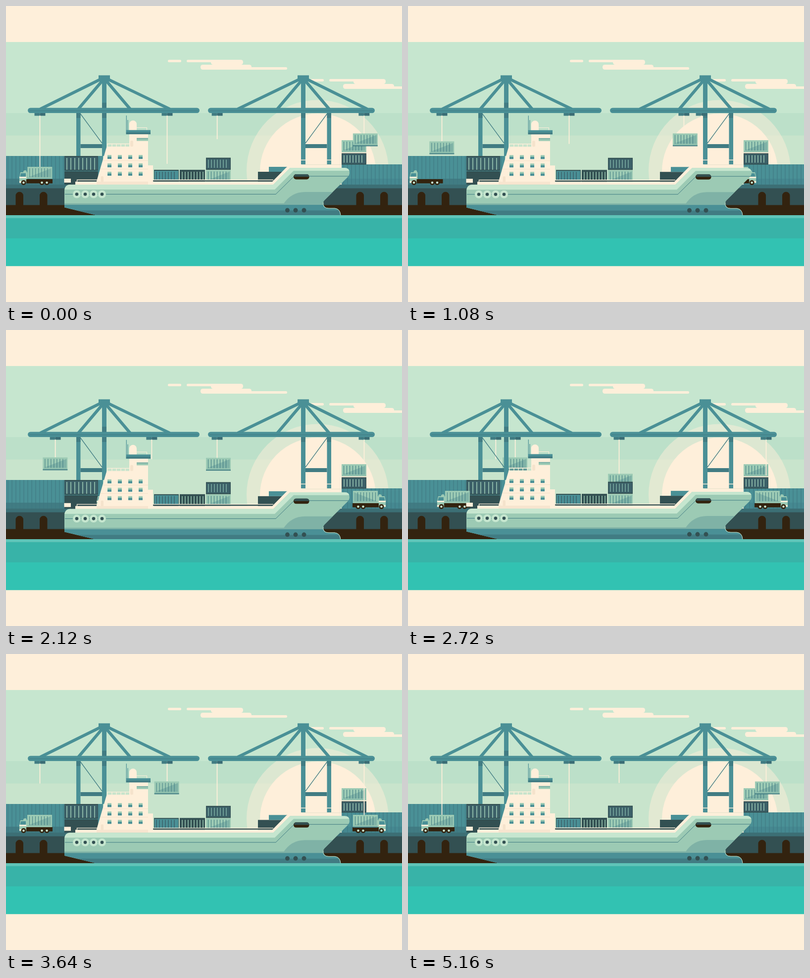
Recreate the animation shown at these times as an HTML page. Size 800x600 px, loop 5.2 s.

```html
<!DOCTYPE html>
<html lang="en">
<head>
<meta charset="utf-8">
<title>Harbour</title>
<style>
  html, body { margin: 0; width: 100%; height: 100%; overflow: hidden; background: #feefda; }
  svg { display: block; width: 800px; height: 600px; }
</style>
</head>
<body>
<svg id="stage" viewBox="0 0 800 600"></svg>
<script>
const LOOP = 5200;
const cream = '#feefda', pale = '#c6e6cf', mint = '#9ccab4', sage = '#7fb2a6',
      teal = '#4a9096', deep = '#417c83', slate = '#335052', steel = '#3c6068', brown = '#33230f';

// Drawing helpers
const rect = (x, y, w, h, fill, r = 0) =>
  `<rect x="${x}" y="${y}" width="${w}" height="${h}" rx="${r}" fill="${fill}"/>`;
const path = (d, fill) => `<path d="${d}" fill="${fill}"/>`;
const line = (d, stroke, w = 1) => `<path d="${d}" fill="none" stroke="${stroke}" stroke-width="${w}"/>`;
const disc = (x, y, r, fill) => `<circle cx="${x}" cy="${y}" r="${r}" fill="${fill}"/>`;
const group = (id, body) => `<g id="${id}">${body}</g>`;
const repeat = (n, draw) => Array.from({ length: n }, (_, i) => draw(i)).join('');
const ribs = (x, y, w, h, step, stroke, sw = 1) =>
  repeat(Math.floor(w / step), i => line(`M${x + i * step} ${y}v${h}`, stroke, sw));

function lightBox(x, y) {
  return rect(x, y, 50, 25, mint) +
    path(`M${x + 2} ${y + 21}L${x + 48} ${y + 3}V${y + 21}Z`, sage) +
    ribs(x + 4.5, y + 3, 46, 18, 6, deep) +
    line(`M${x + 1} ${y + 22.5}h48`, sage);
}

function darkBox(x, y, w, h, fill, rib) {
  return rect(x, y, w, h, slate) + rect(x + 1, y + 2, w - 2, h - 4, fill) +
    ribs(x + 5, y + 4, w - 3, h - 8, 6, rib, 1.5);
}

const load = id => group(id, lightBox(-25, 0) + rect(-25, 24, 50, 2, deep));

const trolley = id => group(id,
  rect(-11, 217, 11, 5.5, deep) + rect(0, 217, 11, 5.5, '#3a6d75') +
  `<rect class="cable" x="-.9" y="222" width="1.8" height="0" fill="${cream}"/>`);

const truck = id => group(id,
  group(id + 'Box', lightBox(43, 326)) +
  path('M35 338V335Q36 333 39 333Q42 333 42 338Z', mint) +
  path('M29 337H43V359H27V348Z', mint) +
  path('M30 339H40V346H28.5Z', teal) +
  rect(27, 346, 14, 3, cream) + rect(27, 355, 6, 3, cream) +
  rect(41, 351, 53, 8.5, brown) +
  [35.5, 72.5, 82.5].map(x => disc(x, 358, 5, brown) + disc(x, 358, 2.3, pale)).join(''));

const cloud = (x, y) => `<g transform="translate(${x} ${y})">` +
  rect(327, 109, 27, 5, cream, 2.5) + rect(365, 109, 70, 5, cream, 2.5) +
  rect(414, 109, 65, 10, cream, 4.5) + rect(393, 119, 103, 10, cream, 4.5) +
  rect(480, 124, 88, 5, cream, 2.5) + '</g>';

// Mast at x 198.5; the second crane is a mirror of the first
const frame = foot =>
  line('M190 149L69 209M207 149L331 209', teal, 6) +
  line('M195 151L146 209M202 151L251 209', teal, 6) +
  line('M150 218L194 278', deep, 1.3) +
  rect(142, 217, 8.5, foot - 217, teal) + rect(194, 146, 9, foot - 146, teal) +
  rect(142, 217, 8.5, 10, deep) + rect(194, 217, 9, 10, deep) +
  rect(150.5, 280, 43.5, 8, deep) + rect(187, 140.5, 23, 12.5, teal);

const beam = (x, w) => rect(x, 206.5, w, 10.5, teal, 5.2) + line(`M${x + 3} 212.5h${w - 6}`, deep, 1.2);

const arch = x => path(`M${x} 405V384.5a7.75 7.75 0 0 1 15.5 0V405Z`, brown);

const backdrop =
  rect(0, 73, 800, 351, pale) + rect(0, 217, 800, 46, '#bce0c9') + rect(0, 262.5, 800, 162, '#c8e4cc') +
  `<circle cx="629.5" cy="334" r="143.5" fill="${cream}" opacity=".5"/>` + disc(630, 335, 117, cream) +
  cloud(0, 0) + cloud(288, 39);

const quay =
  rect(0, 304, 196, 58, teal) + rect(0, 350, 196, 12, deep) + ribs(4, 304, 196, 58, 8, '#3e7780') +
  rect(678, 321, 122, 41, teal) + rect(678, 350, 122, 12, '#458890') + ribs(682, 321, 122, 41, 8, '#3e7780') +
  rect(0, 362, 800, 8, '#3c6f75') + rect(0, 369.5, 800, 35, slate) + rect(0, 403.5, 800, 21, brown) +
  [19.5, 68, 707.5, 756].map(arch).join('') +
  rect(118, 304, 68, 30, slate) + rect(119, 306, 66, 26, steel) + ribs(123, 308, 68, 24, 8, mint, 1.6) +
  rect(118, 335, 68, 27, slate);

const hull = 'M118 408V374Q119 362 130 362H540L574 328H684Q694 328 694 338Q694 343 690 347L643 394' +
  'Q638 400 643 406Q646 410 652 410H664Q675 411 676 424V428H199L118 408.3Z';

const cargo =
  darkBox(299, 332, 50, 25, teal, steel) + darkBox(351, 332, 51, 25, slate, mint) +
  lightBox(404, 332.5) + darkBox(404, 307.5, 50, 24.5, steel, sage) +
  rect(509, 336, 50, 21, slate) + rect(531, 326, 38, 10, teal);

const house =
  line('M243.3 222V252M246 231V252', teal, 1.2) +
  path('M249 253V239.5a7.5 7.5 0 0 1 15 0V253Z', cream) +
  line('M264 246.5H284.5V252', cream) +
  path('M181 362L203.5 285H249V259H287V323H297V362Z', cream) +
  rect(242.5, 251.5, 49.5, 5, teal) + rect(242.5, 256, 49.5, 4, deep) +
  rect(264, 267.5, 23, 3, sage) + rect(264, 270, 23, 3.5, mint) +
  line('M205 285V279.5H249M214 279V285M223 279V285M232 279V285M241 279V285', cream, 1.3) +
  rect(251, 273, 6, 12, '#f5e3cc', 2) +
  line('M196 313.5H287M191 330.5H287', '#f3e0c8') +
  repeat(12, i => {
    const x = 205 + i % 4 * 21, y = 302 + Math.floor(i / 4) * 17;
    return rect(x, y, 8, 4, mint) + rect(x, y + 3.5, 8, 4.5, teal);
  }) +
  rect(191.5, 345, 5.5, 12, '#f5e3cc', 2) + rect(183, 356, 104, 6, '#f7e5cf');

const ship =
  rect(131, 350, 9, 13, slate) + rect(117.5, 350, 13.5, 8, cream) +
  cargo + line('M297 354.5H540', slate, 2.5) +
  rect(568, 321, 110, 9, cream) + line('M598 321.5H678', '#e6e2cb') +
  path('M140 356H538L567 326.5H580L543 363H140Z', cream) +
  line('M143.5 357V352.5H540', cream, 1.3) + house +
  `<clipPath id="hullClip"><path d="${hull}"/></clipPath><g clip-path="url(#hullClip)">` +
  rect(110, 320, 600, 110, mint) +
  path('M110 360H539L573 326H700V334H581L543 372H110Z', pale) +
  path('M560 402Q576 377 604 377H700V402Z', sage) +
  rect(110, 400, 600, 4, sage) + rect(110, 403, 600, 26, teal) + rect(110, 414.5, 600, 14, deep) +
  '</g>' +
  line('M119 381.5H545L582 345H692', deep) +
  line('M641 398Q639 410 652 410H664Q675 411 676 424', pale, 1) +
  rect(581, 341, 31.5, 10.5, brown, 5) + path('M582 346Q582 341 587 341H607Q612 341 612 346Z', slate) +
  [143, 160, 177, 194].map(x => disc(x, 381.5, 8, pale) + disc(x, 381.5, 3.3, slate)).join('') +
  [568.5, 585, 602].map(x => disc(x, 414, 4.5, slate)).join('');

const water =
  rect(0, 424, 800, 7, '#5fc4b8') + rect(0, 430, 800, 42, '#38b3a8') +
  rect(0, 471, 800, 56.5, '#32c2b2') + rect(0, 527.5, 800, 73, cream);

document.getElementById('stage').innerHTML =
  rect(0, 0, 800, 600, cream) + backdrop + quay +
  trolley('westFull') + trolley('westFree') + load('westLoad') +
  frame(304) + rect(194, 196, 9, 11, deep) + beam(44, 347) +
  lightBox(678, 272) + rect(678, 296.5, 50, 2, cream) + darkBox(678, 298.5, 50, 23, steel, mint) +
  `<g transform="matrix(-1 0 0 1 799 0)">${frame(321)}</g>` + rect(595, 311.5, 63, 1.5, cream) +
  beam(408, 337) +
  truck('westTruck') + truck('eastTruck') +
  load('eastLoad') + trolley('eastFull') + trolley('eastFree') +
  group('ship', ship) + water;

// Motion helpers
const $ = id => document.getElementById(id);
const part = (t, a, b) => Math.min(1, Math.max(0, (t - a) / (b - a)));
const ease = (t, a, b, from, to) => from + (to - from) * (1 - Math.cos(Math.PI * part(t, a, b))) / 2;
const move = (id, x, y) => $(id).setAttribute('transform', `translate(${x.toFixed(2)} ${y.toFixed(2)})`);
const show = (id, on) => { $(id).style.display = on ? '' : 'none'; };

function hang(id, x, y) {
  move(id, x, 0);
  $(id).querySelector('.cable').setAttribute('height', Math.max(0, y - 222).toFixed(2));
}

// Distance still to roll before the stop
const arrive = (t, stop) => t < stop ? 1.306e-4 * (stop - t) ** 2 : 0;

// Rolls back a little, then drives off
function leave(t, start) {
  const p = Math.max(0, (t - start) / 1160);
  return 99 * (1.8 * p ** 3 - 0.8 * p ** 2);
}

function west(t) {
  const fullX = ease(t, 1700, 3560, 68.5, 325.5);
  const freeX = ease(t, 1700, 3560, 325.5, 68.5);
  const fullY = t < 2000 ? ease(t, 0, 1600, 326, 258.3) : ease(t, 3640, 5160, 258.3, 333);
  const freeY = t < 2000 ? 320 - 58 * part(t, 0, 1550) : ease(t, 3560, 5040, 262, 326);
  hang('westFull', fullX, fullY);
  hang('westFree', freeX, freeY);
  move('westLoad', ease(t, 1700, 3560, 68.3, 324.6), fullY);

  show('westTruck', t < 1500 || t > 2090);
  show('westTruckBox', t > 2000);
  move('westTruck', t < 1500 ? -leave(t, 260) : arrive(t, 3215), 0);
}

function east(t) {
  const fullX = ease(t, -27, 2033, 723.5, 426.5);
  const freeX = ease(t, -27, 2033, 426.5, 723.5);
  const lifting = t >= 3640;
  const downY = t < 3530 ? ease(t, 2020, 3530, 258.3, 333) : ease(t, 3530, 5060, 333, 261.5);
  const upY = lifting ? ease(t, 3640, LOOP, 326, 258.3) : ease(t, 2020, 3540, 270, 326);
  hang('eastFull', fullX, downY);
  hang('eastFree', freeX, upY);
  move('eastLoad', (lifting ? freeX : fullX) + 2.5, lifting ? upY : downY);

  const x = t < 3000 ? -arrive(t, 1780) : leave(t, 3935);
  show('eastTruck', t > 700 && t < 5130);
  show('eastTruckBox', !lifting);
  $('eastTruck').setAttribute('transform', `matrix(-1 0 0 1 ${(794 + x).toFixed(2)} 0)`);
}

const start = performance.now();

function draw() {
  const t = (performance.now() - start) % LOOP;
  west(t);
  east(t);
  move('ship', 0, (1 - Math.cos(t / 1300 * 2 * Math.PI)) / 2);
  requestAnimationFrame(draw);
}
draw();
</script>
</body>
</html>
```
